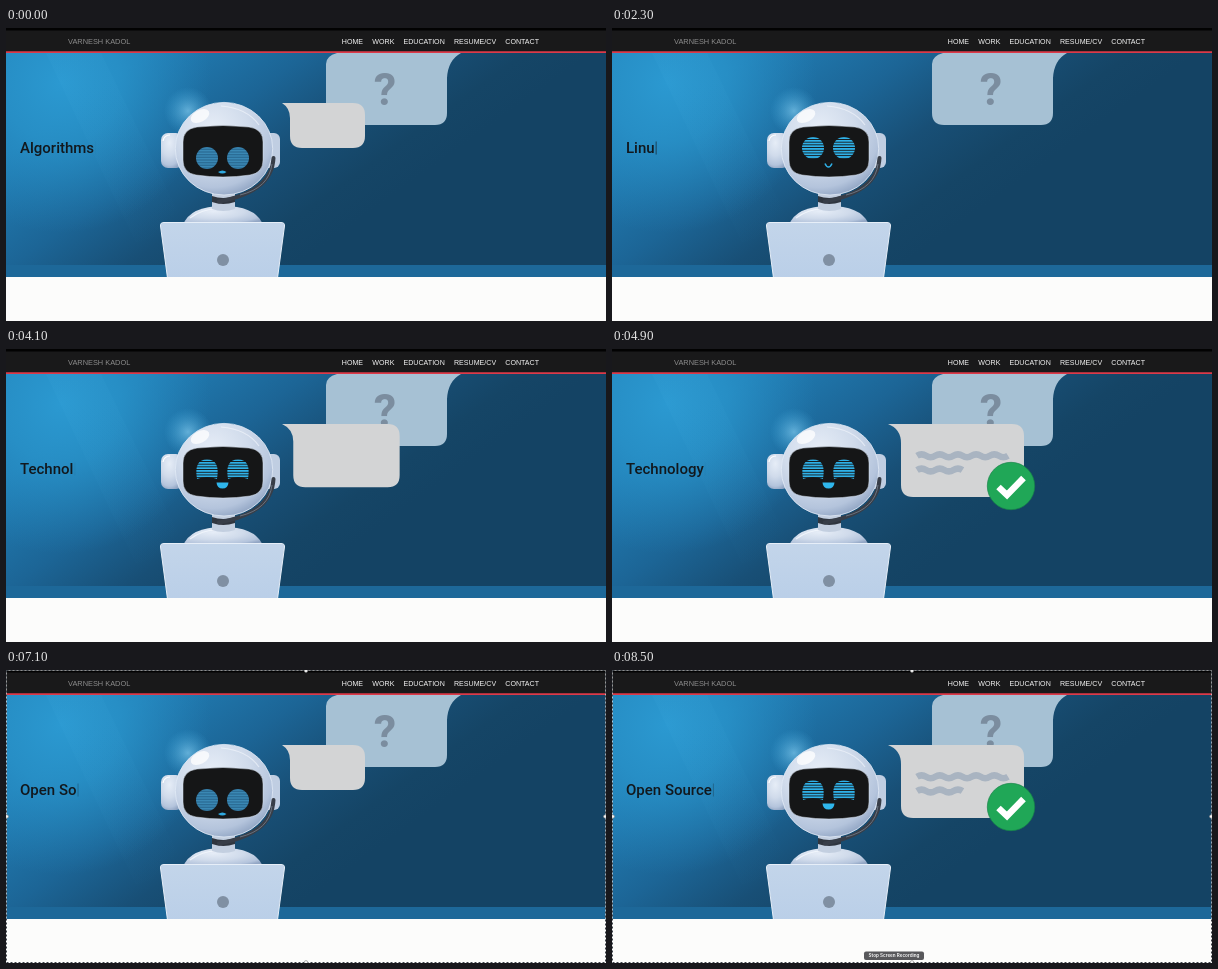
Animation, 600 px wide and 293 px high, one loop 8.6 s. Source, as an HTML page:

```html
<!DOCTYPE html>
<html lang="en">
<head>
<meta charset="utf-8">
<title>Portfolio banner</title>
<style>
html, body { margin: 0; width: 100%; height: 100%; overflow: hidden; background: #fcfcfb; }
svg { display: block; width: 100%; height: 100%; }
.nav { font: 7.1px "Liberation Sans", Arial, sans-serif; fill: #f4f4f4; }
.name { font-size: 7.4px; fill: #8c8c8c; }
.typed { font: 500 15px Roboto, sans-serif; fill: #12181d; white-space: pre; }
.tip { font: 600 4.6px Inter, sans-serif; fill: #fff; text-anchor: middle; }
.mark { font: 700 45px Roboto, sans-serif; fill: #7b8d9f; text-anchor: middle; }
</style>
</head>
<body>
<svg viewBox="0 0 600 293" preserveAspectRatio="none">
  <defs>
    <linearGradient id="sky" gradientUnits="userSpaceOnUse" x1="150" y1="20" x2="300" y2="230">
      <stop offset="0" stop-color="#217eb5"/>
      <stop offset=".36" stop-color="#1c6596"/>
      <stop offset=".62" stop-color="#184f76"/>
      <stop offset=".85" stop-color="#154566"/>
      <stop offset="1" stop-color="#144364"/>
    </linearGradient>
    <radialGradient id="sun" gradientUnits="userSpaceOnUse" cx="55" cy="55" r="150">
      <stop offset="0" stop-color="#2b99d1"/>
      <stop offset=".4" stop-color="#2994cb" stop-opacity=".75"/>
      <stop offset="1" stop-color="#2688bf" stop-opacity="0"/>
    </radialGradient>
    <linearGradient id="ray" x2=".8" y2="1">
      <stop offset="0" stop-color="#49b4e6" stop-opacity=".08"/>
      <stop offset="1" stop-color="#49b4e6" stop-opacity="0"/>
    </linearGradient>
    <radialGradient id="halo">
      <stop offset="0" stop-color="#8fd8fa" stop-opacity=".6"/>
      <stop offset="1" stop-color="#4ab4e8" stop-opacity="0"/>
    </radialGradient>
    <radialGradient id="shell" cx=".38" cy=".28" r=".75">
      <stop offset="0" stop-color="#e6edf7"/>
      <stop offset=".5" stop-color="#d0dbeb"/>
      <stop offset=".85" stop-color="#b4c4dc"/>
      <stop offset="1" stop-color="#93a7c5"/>
    </radialGradient>
    <linearGradient id="lid" x2="0" y2="1">
      <stop offset="0" stop-color="#c3d5ea"/>
      <stop offset="1" stop-color="#bacfe8"/>
    </linearGradient>
    <pattern id="lines" width="4" height="2.7" patternUnits="userSpaceOnUse">
      <path d="M0 .9H4" stroke="#2fb1e8" stroke-width="1.8"/>
    </pattern>
    <pattern id="mesh" width="1.6" height="1.6" patternUnits="userSpaceOnUse">
      <path d="M0 0H1.6V1.6H0Z" fill="#25628a"/>
      <path d="M0 .5H1.6" stroke="#3f92c0" stroke-width=".8"/>
    </pattern>
    <clipPath id="hero"><path d="M0 25H600V249H0Z"/></clipPath>
  </defs>

  <path d="M0 0H600V293H0Z" fill="#fcfcfb"/>
  <g clip-path="url(#hero)">
    <path d="M0 25H600V237H0Z" fill="url(#sky)"/>
    <path d="M0 25H260V237H0Z" fill="url(#sun)"/>
    <path d="M40 25H95L180 200L130 215Z" fill="url(#ray)"/>
    <path d="M0 237H600V249H0Z" fill="#1d6899"/>

    <g id="ask">
      <path d="M331 25H455Q442 32 441 50V85Q441 97 429 97H332Q320 97 320 85V36Q320 28 331 25Z" fill="#a6c1d4"/>
      <text class="mark" x="379" y="76.500">?</text>
    </g>
    <g id="reply">
      <path id="balloon" fill="#d3d4d5"/>
      <g id="waves" fill="none" stroke="#a9b4c1" stroke-width="6.5"></g>
    </g>
    <g id="tick">
      <circle r="23.7" fill="#20a757" stroke="#17854a" stroke-width=".7"/>
      <path d="M-12.5 1L-4 9L12.5 -8" fill="none" stroke="#fff" stroke-width="6.5"/>
    </g>

    <circle cx="182" cy="83" r="24" fill="url(#halo)"/>
    <path d="M177 197Q184 178 217 178T257 197Z" fill="url(#shell)"/>
    <path d="M184 190Q196 181 211 181" fill="none" stroke="#f4f8fd" stroke-width="1.2" opacity=".8"/>
    <path d="M206 164H229V181Q217 185 206 181Z" fill="#c3cfe0"/>
    <path d="M206 168Q217 172 229 168V174Q217 178 206 174Z" fill="#30363f"/>
    <rect x="155" y="105" width="22" height="35" rx="7" fill="url(#shell)"/>
    <rect x="256" y="105" width="18" height="35" rx="6" fill="#c0cee2"/>
    <path d="M157 113Q158 107 164 107" fill="none" stroke="#fff" stroke-width="1.2"/>
    <ellipse cx="218" cy="120.700" rx="48.700" ry="46.300" fill="url(#shell)" stroke="#e3ebf6" stroke-width=".8"/>
    <ellipse cx="194" cy="88" rx="10" ry="6" transform="rotate(-28 194 88)" fill="#fff" opacity=".75"/>
    <path d="M215 78Q241 80 253 97" fill="none" stroke="#f5f8fd" stroke-width="1.2" opacity=".6"/>
    <path d="M191 99Q217 96 243 99Q257 101 257 114V132Q257 145 244 147Q217 151 190 147Q177 145 177 132V114Q177 101 191 99Z" fill="#151617" stroke="#dbe4f0" stroke-width=".5"/>
    <path d="M267.500 130Q266 164 213 173.500" fill="none" stroke="#383e48" stroke-width="4" stroke-linecap="round"/>
    <path d="M266 136Q263 160 234 167" fill="none" stroke="#69727f" stroke-width="1"/>
    <path id="eyeL"/>
    <path id="eyeR"/>
    <path id="mouth"/>

    <path d="M158 194.500H275Q279 194.500 278.500 198L271.500 250H161.500L154.500 198Q154 194.500 158 194.500Z" fill="url(#lid)" stroke="#e6eef8"/>
    <circle cx="217" cy="232" r="6" fill="#8090a3"/>
  </g>

  <path d="M0 0H600V24H0Z" fill="#19191a"/>
  <path d="M0 0H600V2.500H0Z" fill="#020202"/>
  <path d="M0 24.200H600" stroke="#dc3a49" stroke-width="1.800"/>
  <g class="nav">
    <text class="name" x="62" y="15.700">VARNESH KADOL</text>
    <text x="335.800" y="15.500">HOME</text>
    <text x="366.300" y="15.500">WORK</text>
    <text x="397.500" y="15.500">EDUCATION</text>
    <text x="448" y="15.500">RESUME/CV</text>
    <text x="499.300" y="15.500">CONTACT</text>
  </g>

  <text id="word" class="typed" x="14" y="125"></text>
  <path id="caret" d="M0 113.500V126.500" stroke="#17222b" stroke-width=".9"/>

  <g id="frame">
    <path d="M.5 .5H599.500V292.500H.5Z" fill="none" stroke="#fff" stroke-opacity=".55"/>
    <path d="M.5 .5H599.500V292.500H.5Z" fill="none" stroke="#3c4248" stroke-dasharray="2 2"/>
    <g fill="#f2f2f2" stroke="#777" stroke-width=".5">
      <circle cx="300" cy=".8" r="1.700"/>
      <circle cx="300" cy="292.200" r="1.700"/>
      <circle cx=".8" cy="146.500" r="1.700"/>
      <circle cx="599.200" cy="146.500" r="1.700"/>
    </g>
  </g>
  <g id="tip">
    <rect x="252" y="281.500" width="60" height="8.500" rx="2" fill="#58585b"/>
    <text class="tip" x="282" y="287.400">Stop Screen Recording</text>
  </g>
</svg>
<script>
const LOOP = 8600, CYCLE = 3600;
const $ = id => document.getElementById(id);
const set = (id, attrs) => {
  for (const key in attrs) $(id).setAttribute(key, attrs[key]);
};
const clamp = v => Math.max(0, Math.min(1, v));
const ramp = (t, from, to) => clamp((t - from) / (to - from));
const ease = v => v * v * (3 - 2 * v);
const mix = (a, b, k) => a + (b - a) * k;
const show = (id, on) => set(id, { visibility: on ? 'visible' : 'hidden' });
const zoom = (x, y, k) => `translate(${x} ${y}) scale(${k}) translate(${-x} ${-y})`;

// text, first key, ms per key, first erase
const words = [
  ['Algorithms', -2000, 120, 20],
  ['Linux', 960, 110, 2300],
  ['Technology', 3200, 130, 5050],
  ['Open Source', 6200, 140, 9000]
];
const ERASE = 40;

function typed(t) {
  for (const [text, start, step, erase] of words) {
    const count = t < erase
      ? Math.floor((t - start) / step) + 1
      : text.length - Math.floor((t - erase) / ERASE) - 1;
    if (t >= start && count > 0) return text.slice(0, count);
  }
  return '';
}

function wave(y, count) {
  let d = `M305 ${y}q4.550 -2.800 9.100 0`;
  for (let i = 1; i < count; i++) d += 't9.100 0';
  return `<path d="${d}"/>`;
}
$('waves').innerHTML = wave(106.8, 10) + wave(121, 5);

function balloon(k) {
  const l = mix(284, 289, k), r = mix(359, 412, k), b = mix(120, 148, k), c = 12;
  return `M276 75H${r - c}Q${r} 75 ${r} ${75 + c}V${b - c}Q${r} ${b} ${r - c} ${b}` +
    `H${l + c}Q${l} ${b} ${l} ${b - c}V${mix(90, 94, k)}Q${l} 80 276 75Z`;
}

const ROUND = 'M-11 0A11 11 0 1 1 11 0A11 11 0 1 1 -11 0Z';
const HAPPY = 'M-10 9Q-13.500 -10.500 0 -10.500T10 9Q0 5 -10 9Z';
const MOUTHS = {
  think: { d: 'M212 144Q216.500 141 220.500 144Q216.500 147 212 144Z', fill: '#2fa9e0', stroke: 'none' },
  happy: { d: 'M210.500 133.500H222.500Q222 139.500 216.500 139.500T210.500 133.500Z', fill: '#2fb6ec', stroke: 'none' },
  calm: { d: 'M213 135.500Q214.500 139 216.500 139T220 135.500', fill: 'none', stroke: '#2fb1e8', 'stroke-width': 1.5 }
};

function drawFace(p) {
  const mood = p < 450 || p >= 3100 ? 'think' : p < 2000 ? 'happy' : 'calm';
  const down = p < 1800 ? 1 - ease(ramp(p, 350, 500)) : ease(ramp(p, 3000, 3150));
  const y = mix(p < 2000 ? 121 : 120, 130, down);
  const look = { d: mood === 'happy' ? HAPPY : ROUND, fill: `url(#${mood === 'think' ? 'mesh' : 'lines'})` };
  set('eyeL', { ...look, transform: `translate(201 ${y})` });
  set('eyeR', { ...look, transform: `translate(232 ${y})` });
  set('mouth', MOUTHS[mood]);
}

function drawChat(p) {
  const open = p < 2000 ? ease(ramp(p, 350, 600)) : 0;
  const gone = ramp(p, 1900, 2000);
  const pop = p < 2000 ? 1 - gone : ease(ramp(p, 3080, 3230));
  const tick = ease(ramp(p, 800, 1000)) * (1 - gone);
  const ask = p < 2000 ? 1 - gone : ease(ramp(p, 2050, 2250));
  show('ask', ask > 0);
  set('ask', { transform: zoom(455, 25, ask) });
  show('reply', pop > 0);
  set('reply', { transform: zoom(276, 75, pop) });
  set('balloon', { d: balloon(open) });
  set('waves', { opacity: p < 2000 ? ramp(p, 550, 750) : 0 });
  show('tick', tick > 0);
  set('tick', { transform: `translate(399 137) scale(${tick})` });
}

function draw(t) {
  const p = t % CYCLE;
  drawChat(p);
  drawFace(p);
  const text = typed(t);
  $('word').textContent = text;
  const width = text ? $('word').getComputedTextLength() : 0;
  set('caret', {
    transform: `translate(${15.5 + width} 0)`,
    opacity: Math.sin(Math.PI * (t + 40) / 700) ** 2
  });
  show('frame', t >= 6200);
  show('tip', t >= 7800);
}

const begin = performance.now();
function tick() {
  draw((performance.now() - begin) % LOOP);
  requestAnimationFrame(tick);
}
tick();
</script>
</body>
</html>
```
